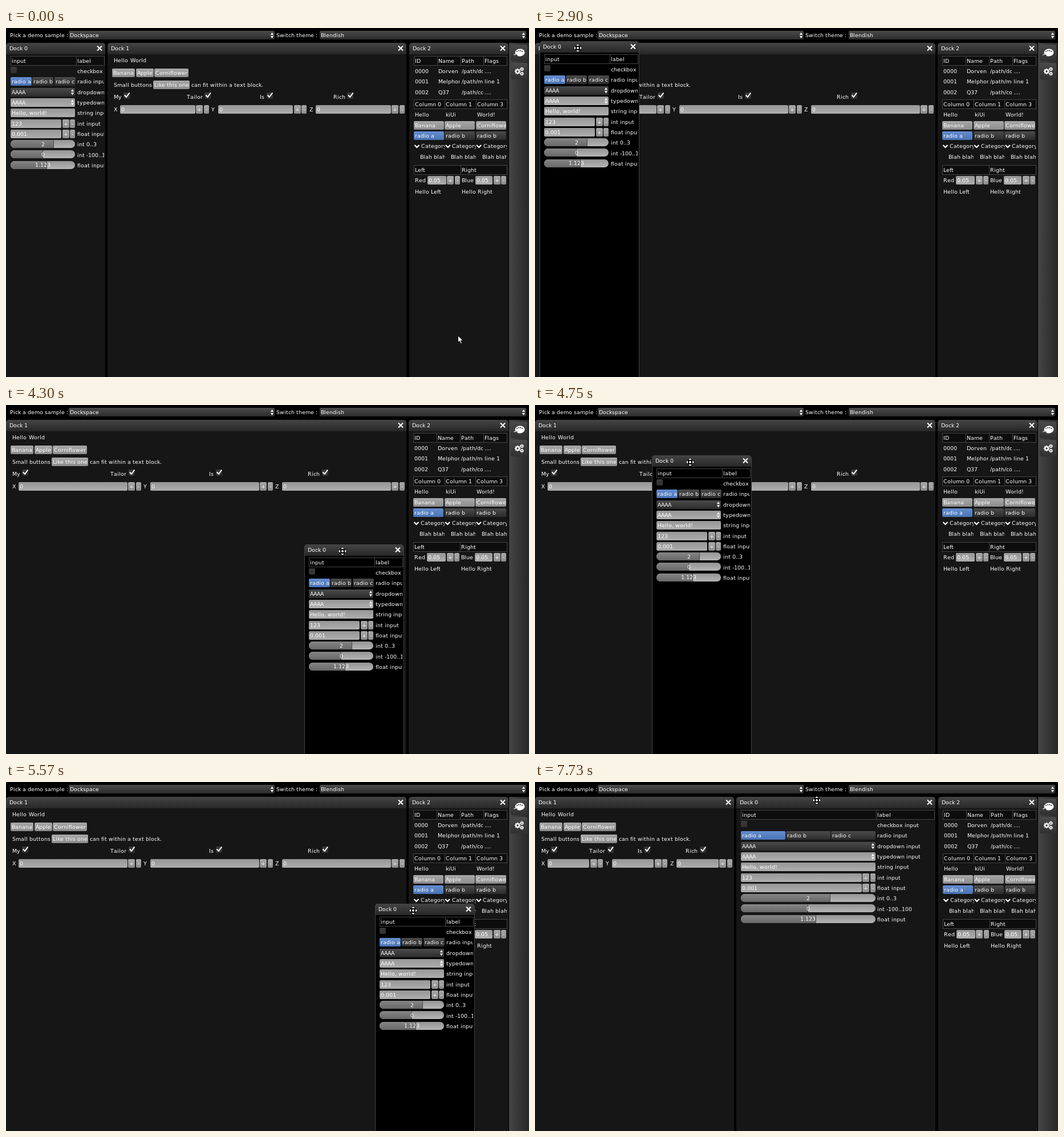
Animation of 917x611 px, one loop 8000 ms. Source, as an HTML page with a canvas:

```html
<!DOCTYPE html>
<html lang="en">
<head>
<meta charset="utf-8">
<title>Dockspace</title>
<style>
  html, body { margin: 0; width: 100%; height: 100%; overflow: hidden; background: #000; }
  canvas { display: block; width: 917px; height: 611px; }
</style>
</head>
<body>
<canvas id="stage" width="917" height="611"></canvas>
<script>
const ctx = document.getElementById('stage').getContext('2d');
const LOOP = 8000, UNDOCK = 2780, REDOCK = 6500;

// Gradients, top to bottom
const DARK = ['#4b4b4b', '#2c2c2c'];
const FIELD = ['#969696', '#aeaeae'];
const BUTTON = ['#a8a8a8', '#8c8c8c'];
const BLUE = ['#638dcf', '#4a73b4'];
const TITLE = ['#454545', '#272727'];

// The pointer is sampled on a regular tick along one smooth path: tick, x, y
const tickAt = t => Math.floor((t - 677) / 116);
const PATH = [
  [-1, 792, 538], [4, 170, 22], [6, 106, 143], [8, 84, 93], [12, 51, 32], [14, 59, 39], [17, 59, 39],
  [20, 92, 34], [25, 422, 50], [30, 654, 235], [31, 590, 256], [34, 172, 34], [35, 272, 100],
  [38, 809, 88], [42, 714, 225], [45, 656, 245], [50, 670, 240], [54, 693, 240], [56, 693, 240],
  [60, 494, 32]
];

// Monotone cubic through the key points, so it never overshoots them
function pointer(tick) {
  const last = PATH.length - 1;
  const i = Math.min(last - 1, Math.max(0, PATH.findLastIndex(p => p[0] <= tick)));
  const span = PATH[i + 1][0] - PATH[i][0];
  const u = Math.min(1, Math.max(0, (tick - PATH[i][0]) / span));
  return [1, 2].map(axis => {
    const slope = j => (PATH[j + 1][axis] - PATH[j][axis]) / (PATH[j + 1][0] - PATH[j][0]);
    const tangent = j => {
      if (j < 1 || j >= last) return 0;
      const a = slope(j - 1), b = slope(j);
      return a * b > 0 ? 2 * a * b / (a + b) : 0;
    };
    const a = PATH[i][axis], b = PATH[i + 1][axis];
    return Math.round(a + (b - a) * u * u * (3 - 2 * u)
      + span * u * (1 - u) * (tangent(i) * (1 - u) - tangent(i + 1) * u));
  });
}

// Text advances by whole pixels
const advance = c => Math.round(ctx.measureText(c).width);
const widthOf = s => [...s].reduce((w, c) => w + advance(c), 0);

function text(s, x, y, right = 917) {
  x = Math.floor(x);
  ctx.save();
  ctx.beginPath();
  ctx.rect(x - 1, y - 10, right - x + 1, 20);
  ctx.clip();
  ctx.fillStyle = '#fff';
  for (const c of s) {
    ctx.fillText(c, x, Math.round(y + 3.4));
    x += advance(c);
  }
  ctx.restore();
}

const centred = (s, x, y) => text(s, x - widthOf(s) / 2 + .5, y);

function box(x, y, w, h, shades, r = 2) {
  const left = Math.round(x), top = Math.round(y);
  const g = ctx.createLinearGradient(0, top, 0, top + h);
  shades.forEach((c, i) => g.addColorStop(i, c));
  ctx.fillStyle = g;
  ctx.beginPath();
  ctx.roundRect(left, top, Math.round(x + w) - left, h, r);
  ctx.fill();
}

function line(points, width, colour = '#fff') {
  ctx.beginPath();
  points.forEach(p => ctx.lineTo(...p));
  ctx.lineWidth = width;
  ctx.strokeStyle = colour;
  ctx.stroke();
}

function shape(points, fill = '#fff', stroke) {
  ctx.beginPath();
  points.forEach(p => ctx.lineTo(...p));
  ctx.closePath();
  ctx.fillStyle = fill;
  ctx.fill();
  if (stroke) {
    ctx.lineWidth = 1;
    ctx.strokeStyle = stroke;
    ctx.stroke();
  }
}

function dot(x, y, r, fill = '#fff') {
  ctx.beginPath();
  ctx.arc(x, y, r, 0, 7);
  ctx.fillStyle = fill;
  ctx.fill();
}

// Controls take the centre line of their row as y
function label(s, x, y, w, shades) {
  box(x, y - 7.7, w, 15, shades);
  text(s, x + 2.5, y, x + w);
}

function combo(s, x, y, w, shades) {
  label(s, x, y, w, shades);
  const cx = Math.floor(x + w - 4.5) + .5;
  for (const d of [-1, 1]) {
    shape([[cx - 2.7, y + d], [cx + 2.7, y + d], [cx, y + d * 5]]);
  }
}

function spinner(s, x, y, w) {
  label(s, x, y, w, FIELD);
  box(x + w + 1.5, y - 7.7, 12, 15, BUTTON);
  centred('+', x + w + 7.5, y);
  box(x + w + 15, y - 7.7, 9, 15, BUTTON);
  centred('-', x + w + 19.5, y);
}

function slider(s, x, y, w, k) {
  const knob = Math.round(x + w * k);
  box(x, y - 7.8, w, 14, ['#959595', '#b4b4b4'], 7);
  ctx.save();
  ctx.beginPath();
  ctx.rect(x, y - 9, knob - x, 18);
  ctx.clip();
  box(x, y - 7.8, w, 14, ['#858585', '#686868'], 7);
  ctx.restore();
  line([[knob - .5, y - 7.5], [knob - .5, y + 6]], 1, '#4a4a4a');
  centred(s, x + w / 2, y - .7);
}

function checkbox(x, y, on) {
  box(x - 5.5, y - 5.5, 11, 11, ['#3a3a3a', '#303030']);
  if (on) line([[x - 3.5, y - 1], [x - .5, y + 2.5], [x + 5, y - 5]], 2);
}

// Header row; edges holds one more entry than names
function header(names, edges, y) {
  names.forEach((name, i) => {
    const [x, end] = [edges[i], edges[i + 1]].map(e => Math.round(e) + .5);
    ctx.fillStyle = 'rgba(0, 0, 0, .4)';
    ctx.fillRect(x, y, end - x, 16);
    ctx.lineWidth = 1;
    ctx.strokeStyle = '#444';
    ctx.strokeRect(x, y + .5, end - x, 16);
    text(name, edges[i] + 2.5, y + 8.3, end);
  });
}

const edgesOf = (left, w, n) => Array.from({ length: n + 1 }, (_, i) => left + w * i / n);

function panel(name, x, w, floating) {
  ctx.fillStyle = floating ? '#000' : '#161616';
  ctx.fillRect(x, 36, w, 600);
  box(x, 26, w, 20, TITLE, [5, 5, 0, 0]);
  if (floating) {
    ctx.beginPath();
    ctx.roundRect(x + .5, 26.5, w, 600, [5, 5, 0, 0]);
    ctx.lineWidth = 1;
    ctx.strokeStyle = '#414141';
    ctx.stroke();
  }
  text(name, x + 6, 35.7);
  const cx = x + w - 10, cy = 35.5;
  for (const d of [-4, 4]) line([[cx - 4, cy - d], [cx + 4, cy + d]], 2);
}

function inputs(x, w, dy = 0, floating = false) {
  ctx.save();
  ctx.translate(0, dy);
  panel('Dock 0', x, w, floating);
  const left = x + 8, right = x + w - 2, split = left + .7 * (w - 10);
  const cw = split - left - 1.5;
  const row = i => 75.7 + i * 18.3;
  header(['input', 'label'], [left, split, right], 49);
  checkbox(x + 13.5, 73.5);
  edgesOf(left, cw + 1.5, 3).slice(0, 3).forEach((e, i) =>
    label('radio ' + 'abc'[i], e, row(1), cw / 3 - .7, i ? DARK : BLUE));
  combo('AAAA', left, row(2), cw, DARK);
  combo('AAAA', left, row(3), cw, FIELD);
  label('Hello, world!', left, row(4), cw, FIELD);
  spinner('123', left, row(5), cw - 24);
  spinner('0.001', left, row(6), cw - 24);
  slider('2', left, row(7), cw, 2 / 3);
  slider('0', left, row(8), cw, .5);
  slider('1.123', left, row(9), cw, 1.123 / 2);
  ['checkbox input', 'radio input', 'dropdown input', 'typedown input', 'string input',
    'int input', 'float input', 'int 0..3', 'int -100..100', 'float input']
    .forEach((s, i) => text(s, split + 2.5, row(i), right));
  ctx.restore();
}

function widgets(x, w) {
  panel('Dock 1', x, w);
  text('Hello', x + 11, 57);
  text('World', x + 40, 57);
  let bx = x + 8;
  for (const s of ['Banana', 'Apple', 'Corniflower']) {
    const bw = widthOf(s) + 4;
    label(s, bx, 78.5, bw, BUTTON);
    bx += bw + 1.5;
  }
  text('Small buttons', x + 11, 100);
  label('Like this one', x + 80, 100, 64, BUTTON);
  text('can fit within a text block.', x + 147, 100);
  edgesOf(x + 11, w - 10.5, 4).slice(0, 4).forEach((cx, i) => {
    const s = ['My', 'Tailor', 'Is', 'Rich'][i];
    text(s, cx, 121);
    checkbox(cx + widthOf(s) + 8.5, 118.5, true);
  });
  const period = (w - 9.5) / 3;
  [...'XYZ'].forEach((s, i) => {
    const cx = x + i * period;
    text(s, cx + 11, 143);
    spinner('0', cx + 22, 143, period - 40);
  });
}

function tables(x) {
  const left = x + 8, cw = 870 - x;
  panel('Dock 2', x, 881 - x);

  const q = edgesOf(left, cw, 4);
  header(['ID', 'Name', 'Path', 'Flags'], q, 49);
  [['0000', 'Dorven', '/path/dorven', '....'], ['0001', 'Melphor', '/path/melphor', 'line 1'],
    ['0002', 'Q37', '/path/code', '....']]
    .forEach((row, r) => row.forEach((s, i) => text(s, q[i] + 2.5, 75.7 + r * 18.3, q[i + 1] - 1)));

  const t = edgesOf(left, cw, 3);
  header(['Column 0', 'Column 1', 'Column 3'], t, 125);
  ['Hello', 'kiUi', 'World!'].forEach((s, i) => {
    text(s, t[i] + 2.5, 152);
    label(['Banana', 'Apple', 'Corniflower'][i], t[i], 170.3, cw / 3 - 1.2, BUTTON);
    label(i ? 'radio b' : 'radio a', t[i], 188.6, cw / 3 - 1.2, i ? DARK : BLUE);
    line([[t[i] + 1.5, 205], [t[i] + 5.5, 209], [t[i] + 9.5, 205]], 2.2);
    text('Category', t[i] + 13.5, 207, t[i + 1]);
    text('Blah blah', t[i] + 11.5, 225.3, t[i + 1]);
  });

  const h = edgesOf(left, cw, 2);
  header(['Left', 'Right'], h, 240);
  ['Red', 'Blue'].forEach((s, i) => {
    const gap = widthOf(s) + 5;
    text(s, h[i] + 2.5, 266.7);
    spinner('0.05', h[i] + gap, 266.7, cw / 2 - gap - 25);
    text(i ? 'Hello Right' : 'Hello Left', h[i] + 2.5, 286.3);
  });
}

function gear(x, y, r) {
  for (let a = 0; a < Math.PI; a += Math.PI / 4) {
    const c = Math.cos(a) * r, s = Math.sin(a) * r;
    line([[x - c, y - s], [x + c, y + s]], r * .45);
  }
  dot(x, y, r * .75);
  dot(x, y, r * .34, '#3c3c3c');
}

function chrome() {
  ctx.fillStyle = '#000';
  ctx.fillRect(0, 0, 917, 611);
  text('Pick a demo sample :', 7, 13);
  combo('Dockspace', 109.5, 13, 361, DARK);
  text('Switch theme :', 474, 13);
  combo('Blendish', 549.5, 13, 362, DARK);

  const g = ctx.createLinearGradient(882, 0, 917, 0);
  TITLE.forEach((c, i) => g.addColorStop(i, c));
  ctx.fillStyle = g;
  ctx.fillRect(882, 26, 35, 585);
  for (const y of [29, 61]) box(885, y, 29, 29, ['#4a4a4a', '#303030'], 3);

  ctx.beginPath();
  ctx.ellipse(901, 43, 8.5, 6.5, -.1, 0, 7);
  ctx.fillStyle = '#fff';
  ctx.fill();
  for (let i = 0; i < 4; i++) dot(896 + i * 3, 41 - Math.sin(i) * 1.5, 1.1, '#3c3c3c');
  dot(894, 48, 2.6, '#3c3c3c');
  line([[890, 47], [899, 45]], 1.2);
  gear(897, 76, 5);
  for (const y of [72, 80]) gear(904.5, y, 3.3);
}

function arrowCursor(x, y) {
  shape([[0, 0], [0, 12], [2.8, 9.6], [5, 14.5], [7, 13.5], [5, 8.8], [8.7, 8.6]]
    .map(p => [x + .5 + p[0], y + .5 + p[1]]), '#fff', '#000');
}

function head(x, y, angle, tip, base, half) {
  const c = Math.cos(angle), s = Math.sin(angle);
  shape([[tip, 0], [base, half], [base, -half]]
    .map(([u, v]) => [x + u * c - v * s, y + u * s + v * c]), '#fff', '#000');
}

function moveCursor(x, y) {
  dot(x, y, 5.5, '#000');
  for (let i = 0; i < 4; i++) head(x, y, i * Math.PI / 2, 7.5, 3.5, 3.8);
  dot(x, y, 2);
}

function resizeCursor(x, y) {
  for (const angle of [0, Math.PI]) head(x, y, angle, 8, 3, 4);
  line([[x - 4, y], [x + 4, y]], 2);
}

function draw(t) {
  const [x, y] = pointer(tickAt(t));
  const floating = t >= UNDOCK && t < REDOCK;
  ctx.font = '9.45px "DejaVu Sans", sans-serif';
  chrome();
  tables(floating ? 706 : 707);
  if (floating) {
    widgets(0, 702);
    inputs(x - 67, 174, y - 38, true);
  } else if (t < UNDOCK) {
    inputs(0, 174);
    widgets(178, 524);
  } else {
    widgets(0, 349);
    inputs(353, 349);
  }
  if (t < 2320) arrowCursor(x, y);
  else if (t < REDOCK || t > 7600) moveCursor(x, y);
  else if (t < 7370) resizeCursor(x, y);
  else arrowCursor(x, y);
}

const start = performance.now();
function tick() {
  draw((performance.now() - start) % LOOP);
  requestAnimationFrame(tick);
}
tick();
</script>
</body>
</html>
```
